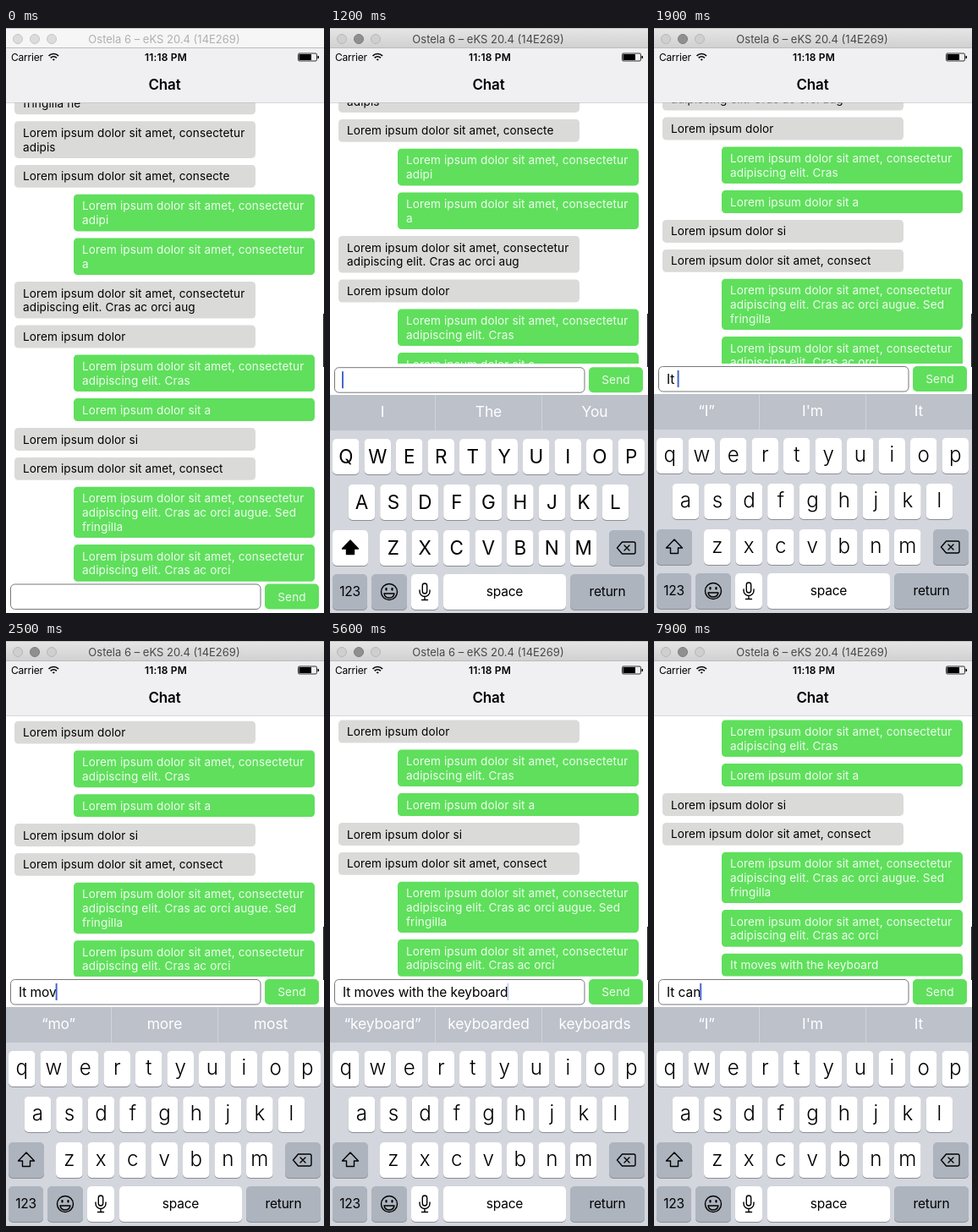
An HTML page for the animation above (8000 ms loop, 376 px wide and 692 px high).

```html
<!DOCTYPE html>
<html lang="en">
<head>
<meta charset="utf-8">
<title>Chat</title>
<style>
html, body { margin: 0; width: 100%; height: 100%; overflow: hidden; background: #fff; }
svg { display: block; width: 376px; height: 692px; font-family: Inter, "Open Sans", sans-serif; }
text { white-space: pre; }
.mid { text-anchor: middle; }
.msg { font-size: 13.6px; letter-spacing: .09px; }
.field { font-size: 15.5px; letter-spacing: -.08px; }
.hint { font-size: 17.4px; letter-spacing: -.1px; fill: #fff; }
.fn { font-size: 15.5px; letter-spacing: -.2px; }
.line { fill: none; stroke: #000; stroke-width: 1.4; stroke-linecap: round; stroke-linejoin: round; }
</style>
</head>
<body>
<svg id="stage" viewBox="0 0 376 692">
  <defs>
    <linearGradient id="bar" x2="0" y2="1">
      <stop stop-color="#e7e6e7"/><stop offset="1" stop-color="#d1d0d1"/>
    </linearGradient>
    <clipPath id="clip"><rect id="view" y="88" width="376" height="567"/></clipPath>
  </defs>
  <rect width="376" height="692" fill="#fff"/>
  <rect x="375" y="338" width="1" height="63" fill="#222"/>
  <g clip-path="url(#clip)"><g id="list"></g></g>

  <g id="input">
    <rect x="5.5" y="400.5" width="295.5" height="29.5" rx="5" fill="#fff" stroke="#777"/>
    <text id="typed" class="field" x="15" y="420.5"></text>
    <rect id="caret" y="405" width="2" height="20" fill="#4567cf"/>
    <g id="send">
      <rect x="306" y="400" width="64" height="30" rx="5" fill="#5fdf5c"/>
      <text class="mid msg" x="338" y="420" fill="#effcef">Send</text>
    </g>
  </g>

  <g id="keyboard">
    <rect y="433" width="376" height="260" fill="#d3d6dc"/>
    <rect y="433" width="376" height="42" fill="#bcc1ca"/>
    <path d="M124.5 433v42M250.5 433v42" stroke="#d0d4da"/>
    <g id="hints"></g>
    <g id="keys"></g>
    <path id="shift" class="line" d="M24 605l-9.5 10h5v6.5h9v-6.5h5z"/>
    <path class="line" d="M345.5 607h13.5q2 0 2 2v10q0 2-2 2h-13.5l-6-7zM348 611l6 6m0-6l-6 6"/>
    <g class="line">
      <circle cx="70" cy="666" r="9.5"/>
      <path d="M64 668h12q-1 5-6 5t-6-5z"/>
      <path d="M66.5 662v1.5M73.5 662v1.5" stroke-width="2.2"/>
      <rect x="109.3" y="656" width="5.4" height="12" rx="2.7"/>
      <path d="M106 664v1.5a6 6 0 0 0 12 0V664M112 671.5v4M108.5 675.5h7"/>
    </g>
  </g>

  <rect y="23" width="376" height="65" fill="#f0f0f2"/>
  <rect y="88" width="376" height=".6" fill="#bdbdc0"/>
  <rect id="chrome" width="376" height="24"/>
  <rect width="376" height="1" fill="#c6c6c6"/>
  <rect y="23" width="376" height="1" fill="#bcbbbc"/>
  <g id="lights"></g>
  <text id="title" class="mid" x="187" y="18" font-size="13">Ostela 6 – eKS 20.4 (14E269)</text>
  <text x="6" y="38.5" font-size="12" letter-spacing="-.2">Carrier</text>
  <g fill="none" stroke="#000" stroke-width="1.7">
    <path d="M50.5 33a8 8 0 0 1 11.6 0M52.7 35.3a5 5 0 0 1 7.2 0"/>
    <path d="M56.3 38.8l-1.6-1.8q1.6-1.2 3.2 0z" fill="#000" stroke="none"/>
  </g>
  <text class="mid" x="189" y="38.5" font-size="12" font-weight="600" letter-spacing=".15">11:18 PM</text>
  <rect x="345.5" y="30" width="22" height="9" rx="1.5" fill="none" stroke="#000" stroke-width=".8"/>
  <rect x="346.5" y="31" width="14.5" height="7" fill="#000"/>
  <rect x="368.5" y="33" width="1.5" height="3" fill="#000"/>
  <text class="mid" x="187.5" y="73" font-size="17" font-weight="600" letter-spacing="-.2">Chat</text>
</svg>
<script>
const $ = id => document.getElementById(id);

function add(parent, tag, attrs, text) {
  const el = document.createElementNS('http://www.w3.org/2000/svg', tag);
  for (const k in attrs) el.setAttribute(k, attrs[k]);
  if (text) el.textContent = text;
  return parent.appendChild(el);
}

// Messages: a leading ">" marks an outgoing one, "|" breaks a line
const LOREM = 'Lorem ipsum dolor sit amet, consectetur|';
const MESSAGES = [
  LOREM + 'adipiscing elit. Cras ac orci augue. Sed|fringilla ne',
  LOREM + 'adipis',
  'Lorem ipsum dolor sit amet, consecte',
  '>' + LOREM + 'adipi',
  '>' + LOREM + 'a',
  LOREM + 'adipiscing elit. Cras ac orci aug',
  'Lorem ipsum dolor',
  '>' + LOREM + 'adipiscing elit. Cras',
  '>Lorem ipsum dolor sit a',
  'Lorem ipsum dolor si',
  'Lorem ipsum dolor sit amet, consect',
  '>' + LOREM + 'adipiscing elit. Cras ac orci augue. Sed|fringilla',
  '>' + LOREM + 'adipiscing elit. Cras ac orci',
  '>It moves with the keyboard'
];

let nextY = 42, lastBubble;
for (const msg of MESSAGES) {
  const mine = msg[0] === '>';
  const lines = msg.slice(mine ? 1 : 0).split('|');
  const x = mine ? 80 : 10, y = nextY, height = 10.2 + 16.7 * lines.length;
  lastBubble = add($('list'), 'g', {});
  add(lastBubble, 'rect', { x, y, width: 285, height, rx: 4.5, fill: mine ? '#5fdf5c' : '#dadbd9' });
  lines.forEach((line, i) => add(lastBubble, 'text',
    { class: 'msg', x: x + 10, y: y + 18.5 + 16.7 * i, fill: mine ? '#effcef' : '#000' }, line));
  nextY += height + 8;
}

// Keys
const letters = [];
function key(x, y, w, dark) {
  add($('keys'), 'rect', { x, y: y + 1, width: w, height: 42, rx: 5, fill: '#8b8e94' });
  return add($('keys'), 'rect', { x, y, width: w, height: 42, rx: 5, fill: dark ? '#adb4be' : '#fff' });
}
[['qwertyuiop', 3, 485], ['asdfghjkl', 21.7, 539], ['zxcvbnm', 59, 593]].forEach(([row, x, y]) =>
  [...row].forEach((ch, i) => {
    key(x + 37.5 * i, y, 31.5);
    letters.push({ ch, y, el: add($('keys'), 'text', { class: 'mid', x: x + 37.5 * i + 15.75 }) });
  }));
const shiftKey = key(3, 593, 42, true);
key(330, 593, 42, true);
[[3, 41, 1, '123'], [49, 42, 1], [96, 32], [134, 145, 0, 'space'], [284, 88, 1, 'return']].forEach(([x, w, dark, label]) => {
  key(x, 645, w, dark);
  if (label) add($('keys'), 'text', { class: 'mid fn', x: x + w / 2, y: 671 }, label);
});

const lights = [14, 34, 54].map(cx => add($('lights'), 'circle', { cx, cy: 13, r: 5.5 }));
const hints = [62, 187.5, 313].map(x => add($('hints'), 'text', { class: 'mid hint', x, y: 459 }));

// Typing runs: start, end, character count at each end, text
const FIRST = 'It moves with the keyboard';
const RUNS = [
  [1400, 1900, 1, 3, FIRST],
  [2100, 3600, 3, 17, FIRST],
  [3800, 5200, 17, 26, FIRST],
  [6100, 6200, 0, 0, ''],
  [7400, 7900, 1, 6, 'It can']
];
const HINTS = [
  [0, 'I', 'The', 'You'],
  [1500, '“I”', 'Th', 'Yo'],
  [1600, '“I”', "I'm", 'It'],
  [2200, 'is', 'was', 'will'],
  [2500, '“mo”', 'more', 'most'],
  [2800, '“moves”', 'movies', 'moved'],
  [3200, '“with”', 'within', 'without'],
  [3600, '“t e”', 'these', 'e rh'],
  [3700, '“the”', 'these', 'them'],
  [4100, 'same', 'first', 'most'],
  [4400, '“ke”', 'keep', 'key'],
  [4900, '“keyb”', 'keyboard', 'keys'],
  [5300, '“keyboard”', 'keyboarded', 'keyboards'],
  [6100, 'I', 'The', 'You'],
  [7500, '“I”', "I'm", 'It']
];
// Caret opacity steps
const CARET = [[0, 0], [800, 1], [5600, .3], [5700, .1], [5800, 0], [6000, 1],
  [6600, .5], [6700, .15], [6800, 0], [7000, .5], [7100, 1]];

const at = (table, t) => table.filter(row => row[0] <= t).pop();
const decay = (t, start) => t < start ? 1 : Math.exp((start - t) / 247);
function spring(t, start) {
  const x = Math.max(0, t - start) * .0207;
  return 1 - (1 + x) * Math.exp(-x);
}

function typedAt(t) {
  const run = at(RUNS, t);
  if (!run) return '';
  const [start, end, from, to, text] = run;
  const p = Math.min(1, (t - start) / (end - start));
  return text.slice(0, from + Math.floor((to - from) * p + 1e-6));
}

function draw(t) {
  const active = t >= 400, open = t >= 850;
  $('chrome').setAttribute('fill', active ? 'url(#bar)' : '#f6f6f6');
  $('title').setAttribute('fill', active ? '#484848' : '#b0b0b0');
  lights.forEach((c, i) => {
    const dark = active && i === 1;
    c.setAttribute('fill', dark ? '#8f8f8f' : active ? '#cfcfcf' : '#dcdcdc');
    c.setAttribute('stroke', dark ? '#7d7d7d' : active ? '#b8b8b8' : '#c6c6c6');
  });

  const scroll = 258 * (1 - decay(t, 1142)) + 35 * (1 - decay(t, 6050));
  $('list').setAttribute('transform', `translate(0 ${-scroll})`);
  $('view').setAttribute('height', open ? 309 : 567);
  lastBubble.setAttribute('visibility', t >= 6050 ? 'visible' : 'hidden');

  $('keyboard').setAttribute('transform', `translate(0 ${259 * (1 - spring(t, 830))})`);
  $('input').setAttribute('transform', `translate(0 ${257.5 * (1 - spring(t, 837))})`);
  $('send').setAttribute('opacity', t >= 6000 && t < 6200 ? .4 : 1);

  const text = typedAt(t);
  $('typed').textContent = text;
  $('caret').setAttribute('x', 14 + (text ? $('typed').getComputedTextLength() : 0));
  $('caret').setAttribute('opacity', at(CARET, t)[1]);

  const upper = !text;
  letters.forEach(({ ch, y, el }) => {
    el.textContent = upper ? ch.toUpperCase() : ch;
    el.setAttribute('font-size', upper ? 22.5 : 24.2);
    el.setAttribute('font-weight', upper ? 400 : 350);
    el.setAttribute('y', y + (upper ? 29 : 28));
  });
  shiftKey.setAttribute('fill', upper ? '#fff' : '#adb4be');
  $('shift').style.fill = upper ? '#000' : 'none';
  const words = at(HINTS, t);
  hints.forEach((el, i) => { el.textContent = words[i + 1]; });
}

let shown = -1;
const origin = performance.now();
function tick() {
  const t = Math.floor((performance.now() - origin) % 8000 / 100) * 100;
  if (t !== shown) draw(shown = t);
  requestAnimationFrame(tick);
}
draw(0);
tick();
</script>
</body>
</html>
```
